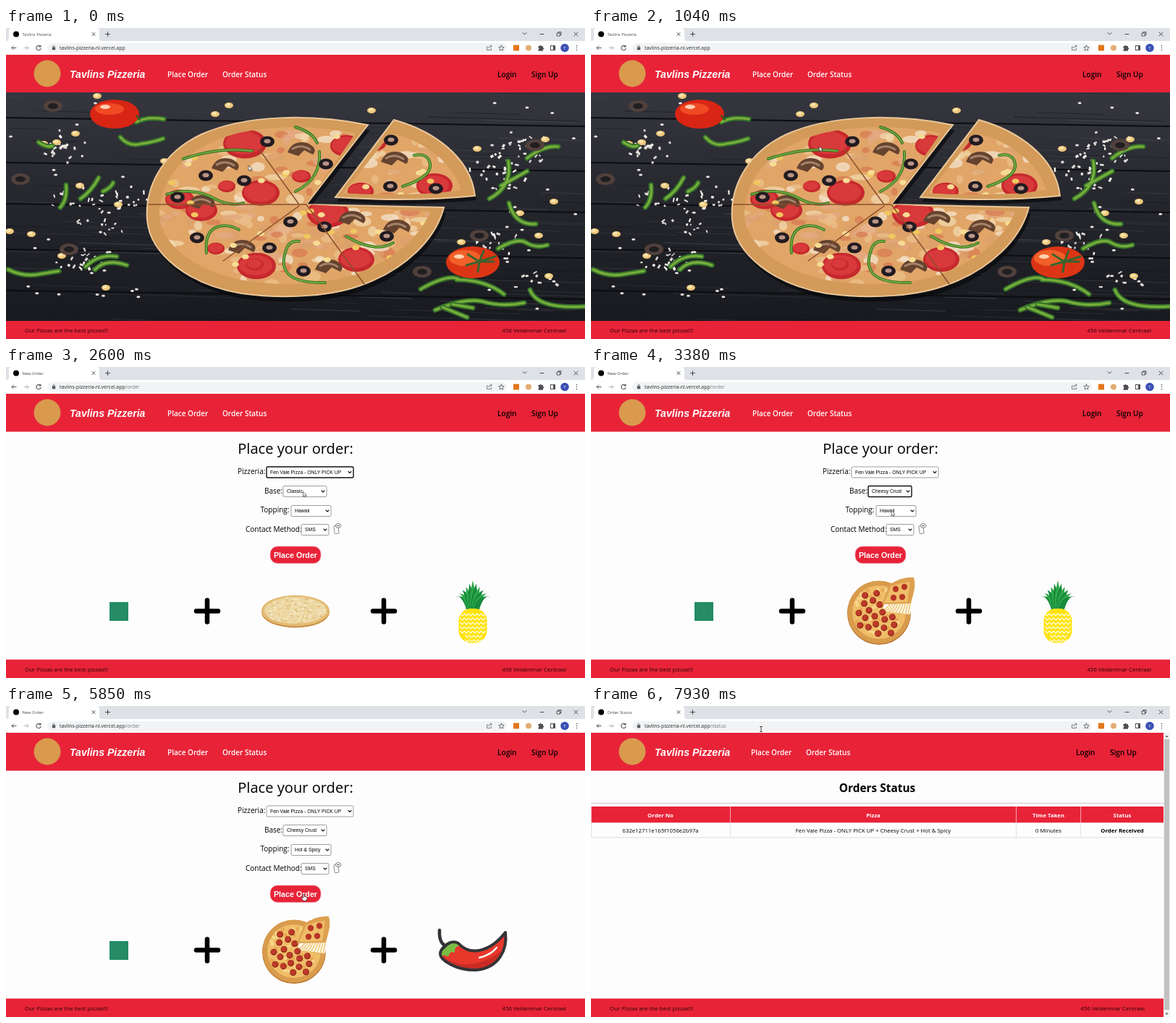
An HTML page for the animation above (8000 ms loop, 800 px wide and 430 px high).

```html
<!DOCTYPE html>
<html lang="en">
<head>
<meta charset="utf-8">
<title>Pizzeria</title>
<style>
html, body { margin: 0; width: 100%; height: 100%; overflow: hidden; background: #fff; }
svg { display: block; width: 800px; height: 430px; font-family: "Open Sans", "Noto Sans", sans-serif; }
.arial { font-family: "Liberation Sans", Arial, sans-serif; }
.line { fill: none; stroke-linecap: round; stroke-linejoin: round; }
</style>
</head>
<body>
<svg id="stage" viewBox="0 0 800 430">
  <g id="page"></g>
  <g id="hero"></g>
  <g id="cursor"></g>
</svg>
<script>
const $ = id => document.getElementById(id);
const RED = '#e82338', BRAND = 'Tavlins Pizzeria', HOST = 'tavlins-pizzeria-nl.vercel.app';

// Shape helpers, all returning markup
const rect = (x, y, w, h, fill, more = '') => `<rect x="${x}" y="${y}" width="${w}" height="${h}" fill="${fill}" ${more}/>`;
const oval = (x, y, rx, ry, fill, more = '') => `<ellipse cx="${x}" cy="${y}" rx="${rx}" ry="${ry}" fill="${fill}" ${more}/>`;
const dot = (x, y, r, fill, more) => oval(x, y, r, r, fill, more);
const shape = (d, fill, more = '') => `<path d="${d}" fill="${fill}" ${more}/>`;
const line = (d, color = '#4a4d51', width = 1, more = '') =>
  `<path class="line" d="${d}" stroke="${color}" stroke-width="${width}" ${more}/>`;
const text = (x, y, size, str, more = '') => `<text x="${x}" y="${y}" font-size="${size}" ${more}>${str}</text>`;
const BOLD = 'font-weight="700"', SEMI = 'font-weight="600"', MID = 'text-anchor="middle"', END = 'text-anchor="end"';
const WHITE = 'fill="#fff"';

let seed = 7;
const rnd = (a = 0, b = 1) => {
  seed = (seed * 16807) % 2147483647;
  return a + (b - a) * seed / 2147483647;
};
const pick = list => list[Math.floor(rnd(0, list.length))];

function buildHero() {
  const body = 'M500 134C420 118 330 120 270 147C212 174 192 224 195 265C199 314 254 355 325 367C390 376 455 370 495 354C552 333 594 292 605 248L415 244Z';
  const slice = 'M455 234L536 127C590 142 642 178 648 232Q560 241 455 234Z';
  const inner = 'M483 145C410 132 335 135 287 157C235 179 211 220 212 261C217 305 270 340 335 350C390 358 445 353 483 341C534 321 571 291 586 254L415 244Z';
  const innerSlice = 'M466 228L532 146C574 153 620 188 629 224Q560 234 466 228Z';
  const olive = ([x, y]) => oval(x, y, 10, 7.5, '#211b20') + oval(x, y - .5, 4.5, 3, '#b99486');
  const salami = ([x, y, r = 22]) => oval(x, y, r, r * .68, '#c6282d') + oval(x - 1, y - 1, r * .85, r * .52, '#d8393a');
  const mushroom = ([x, y]) => shape(`M${x - 19} ${y + 4}Q${x - 12} ${y - 14} ${x + 8} ${y - 9}Q${x + 24} ${y - 2} ${x + 16} ${y + 7}L${x + 4} ${y + 1}L${x - 4} ${y + 9}Z`, '#65432f') +
    line(`M${x - 12} ${y - 1}Q${x} ${y - 8} ${x + 12} ${y}`, '#a5836a', 3);
  const pepper = (d, w = 4) => line(d, '#35742a', w) + line(d, '#79ad3c', w * .45);
  let s = '<defs><clipPath id="view"><rect y="89" width="800" height="316"/></clipPath>' +
    `<clipPath id="pie"><path d="${inner}"/><path d="${innerSlice}"/></clipPath>` +
    '<linearGradient id="wood" x2="0" y2="1"><stop stop-color="#36363f"/><stop offset=".5" stop-color="#25262c"/><stop offset="1" stop-color="#191a1f"/></linearGradient></defs>' +
    '<g clip-path="url(#view)">' + rect(0, 89, 800, 316, 'url(#wood)');

  for (let i = 0; i < 130; i++) {
    const x = rnd(-100, 750), y = rnd(90, 404), w = rnd(40, 220);
    s += line(`M${x} ${y}l${w} ${w * .03}`, pick(['#4b4b54', '#15161a', '#3c3d45']), rnd(.4, 1.2), 'opacity=".6"');
  }
  for (const y of [128, 190, 247, 310, 367]) s += line(`M0 ${y - 4}L800 ${y + 8}`, '#0c0d10', 2);

  // Cheese crumbs and corn spread over the table
  const heaps = [[85, 235], [160, 238], [75, 165], [135, 270], [690, 210], [715, 165], [670, 188], [730, 345], [110, 320], [680, 300]];
  for (let i = 0; i < 170; i++) {
    const [hx, hy] = pick(heaps), spread = rnd(3, 34);
    const a = rnd(0, 6.28), x = hx + Math.cos(a) * spread * 1.2, y = hy + Math.sin(a) * spread * .7;
    s += rect(x, y, rnd(2, 6), rnd(1.5, 3.5), pick(['#f5f1eb', '#ddd8d5']), `transform="rotate(${rnd(0, 180)} ${x} ${y})"`);
  }
  for (let i = 0; i < 55; i++) {
    const x = i % 2 ? rnd(5, 185) : rnd(650, 795);
    s += oval(x, rnd(95, 395), 2.5, 1.5, '#e9e5e1');
  }
  for (const [x, y] of [[126, 94], [308, 107], [289, 119], [505, 114], [52, 160], [70, 158], [96, 146], [219, 184], [651, 167], [35, 285], [102, 218], [155, 244], [77, 315], [138, 359], [745, 154], [757, 240], [736, 287], [629, 296], [750, 343], [5, 281], [710, 256]])
    s += oval(x, y, 6, 4, '#edc77b') + oval(x - 1, y - 1, 3, 2, '#fae5ad');
  s += ['M158 151q12 14 29 9q16-2 30-7', 'M180 130q15-8 38-4', 'M75 248q10-11 8-31', 'M103 236q15-10 25-29', 'M45 158q12 8 19 5', 'M134 226q11-5 14-12', 'M3 334q22 11 45 6l25-4', 'M110 330q18-18 43-14m-30 18q15-16 44-6', 'M668 236q32-17 26-52m-10 34l36-20', 'M720 180q23-18 43-16', 'M695 242q8 31 37 29', 'M680 305q27-16 39-8q14 8 29 3', 'M573 361q37-21 52-14m-2 1q39 0 65 20', 'M593 390q40-17 65-12q27 8 58 2', 'M724 362q10 27 75 23', 'M603 386l34 14m-20-18l28 5'].map(d => pepper(d, 7)).join('');
  s += [[20, 209], [65, 108], [654, 287], [575, 337], [731, 162], [87, 306]].map(([x, y]) => oval(x, y, 13, 8, '#51413d') + oval(x, y, 7, 4, '#211e21')).join('');

  // Tomatoes
  s += oval(150, 119, 34, 20, '#d92514') + oval(143, 112, 20, 8, '#f04a25') + oval(137, 109, 7, 3, '#ffd0b5') + line('M180 121l5 6', '#315923', 2);
  s += oval(645, 324, 37, 22, '#dc3515') + oval(634, 318, 22, 11, '#f06028') + oval(626, 316, 7, 3, '#ffd4b0') +
    line('M654 323l-16-10m16 10l-18 5m18-5l6-15m-6 15l20 0m-20 0l-2 14m2-14l22-7', '#39632c', 3);

  // Pizza
  s += shape(body, '#08090c', 'transform="translate(3 7)" opacity=".7"') + shape(slice, '#08090c', 'transform="translate(2 6)" opacity=".7"');
  for (const d of [body, slice]) s += shape(d, '#d39a59', 'stroke="#e9c79b" stroke-width="2"');
  s += shape(inner, '#e1a568') + shape(innerSlice, '#e1a568') + '<g clip-path="url(#pie)">';
  for (let i = 0; i < 260; i++)
    s += oval(rnd(200, 640), rnd(130, 355), rnd(4, 15), rnd(3, 8), pick(['#f2d8ac', '#edc18b', '#dda06c', '#f4e5cd', '#d97c52', '#e5aa83']), 'opacity=".75"');
  s += [[330, 160, 30], [352, 228, 26], [270, 252], [470, 163], [346, 329, 27], [445, 256, 29], [484, 320, 25], [508, 158, 18], [490, 226, 18], [592, 218, 25], [240, 237, 20], [408, 205, 13], [290, 305, 12], [344, 327, 12], [305, 219, 12]].map(salami).join('');
  s += [[408, 168], [303, 190], [270, 241], [446, 330], [537, 181], [478, 263], [540, 275], [326, 303]].map(mushroom).join('');
  for (let i = 0; i < 42; i++) s += oval(rnd(225, 610), rnd(150, 340), 5, 3.5, pick(['#f0c75f', '#f6dc93']));
  s += '</g>';
  s += ['M245 181q48-17 95-11', 'M400 226q36-18 33-55', 'M222 230q38-11 68 7q21 10 38 5', 'M548 219q47-15 36-37q-5-9-20-6', 'M441 352q-71 2-54-45q4-14 18-12', 'M277 311q-3-30 15-36q14-5 30 4', 'M470 288q40 24 65 9', 'M400 137q24 7 30 22'].map(d => pepper(d)).join('');
  s += [[361, 157], [442, 188], [276, 204], [329, 211], [237, 234], [393, 268], [364, 304], [264, 290], [411, 336], [440, 275], [526, 288], [532, 155], [531, 219], [594, 222]].map(olive).join('');
  s += line('M197 244L415 244L495 354M405 244L350 168M405 246L300 322', '#8c4f2e', 1.5) + '</g>';
  return s;
}

function browser(title, path) {
  let s = rect(0, 0, 800, 18, '#dee1e6') + shape('M0 18q4 0 4-4V4q0-4 4-4H125q4 0 4 4v10q0 4 4 4Z', '#fff') + rect(0, 18, 800, 19, '#fff') +
    rect(57, 21, 635, 13, '#f1f3f4', 'rx="6.5"') + dot(14, 8.5, 4, '#000') + text(22.5, 10.8, 5.8, title, 'fill="#45484c"');
  s += line('M119 6.5l4 4m0-4l-4 4M137.500 8.500h6m-3-3v6M714 6.500l2.500 2.500l2.500-2.500M738 8.500h5M785 6l5 5m0-5l-5 5', '#36393d', .9) +
    line('M761.500 7h4v4h-4ZM763 7v-1.500h4v4h-1.500', '#36393d', .8);
  s += line('M14 27.500H8m2.500-2.500L8 27.500l2.500 2.500', '#54575b', 1) + line('M25 27.500h6m-2.500-2.500l2.500 2.500l-2.500 2.500', '#b2b5b8', 1) +
    line('M47.500 25.500a3.200 3.200 0 1 0 .6 3M48 24v2h-2', '#54575b', 1.1);
  s += rect(63.8, 26.5, 4.4, 3.8, '#54575b') + line('M64.800 26.500v-1.200q1.200-2 2.400 0v1.200', '#54575b', .8);
  s += text(74, 30, 6.9, `${HOST}<tspan fill="#777a7e">${path}</tspan>`, 'fill="#26282b"');
  s += line('M666 26h-1.500v4.500h6v-2M667 28q0-3 4-3m-1.500-1.500l1.700 1.500l-1.700 1.500', '#5f6368', .8) +
    line('M684.500 24l1.100 2.400l2.600.3l-1.900 1.800l.5 2.500l-2.300-1.200l-2.300 1.200l.5-2.500l-1.900-1.800l2.600-.3Z', '#4c4f53', .8);
  s += rect(701, 23.5, 8, 8, '#e2761b') + dot(722, 27.5, 4, '#e2ad74') +
    shape('M735.500 25h2q0-3 2.500 0h2v2.200q3 1 0 2.600v2h-6.500v-2q2-1.300 0-2.600Z', '#4c4f53') +
    rect(752.5, 24.5, 6, 6, 'none', 'stroke="#4c4f53"') + rect(756, 24, 3, 7, '#4c4f53') +
    dot(772, 27.5, 5.8, '#3b50b5') + text(772, 29.8, 6, 'T', `${MID} ${WHITE}`);
  return s + [24.5, 27.5, 30.5].map(y => dot(788.5, y, .8, '#4c4f53')).join('');
}

function frame(status, hover) {
  const w = status ? 791 : 800, dx = status ? -2 : 0, right = status ? -9 : 0;
  let s = rect(0, 37, 800, 393, '#fefdfe') + rect(0, 37, w, 52.5, RED) + rect(0, 404.500, w, 25.500, RED);
  s += dot(57, 63, 18.5, '#d99a4e');
  s += text(88, 69, 14.1, BRAND, `class="arial" font-style="italic" ${BOLD} ${WHITE}`);
  s += text(223 + dx, 67.7, hover ? 11.3 : 10, 'Place Order', `${hover ? BOLD : SEMI} ${WHITE}`);
  s += text((hover ? 309 : 299) + dx, 67.7, 10, 'Order Status', `${SEMI} ${WHITE}`);
  s += text(679 + right, 67.7, 10.1, 'Login', SEMI) + text(726 + right, 67.7, 10.1, 'Sign Up', SEMI);
  s += text(26, 421, 7.9, 'Our Pizzas are the best pizzas!!!', 'fill="#240408"') +
    text(774 + right, 421, 7.9, '456 Veldenmar Centraal', `${END} fill="#240408"`);
  if (status) s += rect(791, 37, 9, 393, '#f1f1f1') + rect(792, 46, 7, 374, '#c1c1c1') +
    shape('M793.500 43l2-2.500l2 2.500ZM793.500 424.500l2 2.500l2-2.500Z', '#555');
  return s;
}

function select(x, y, w, value, focus) {
  return rect(x, y, w, 15, '#fff', `rx="1.500" stroke="${focus ? '#111' : '#85858a'}" stroke-width="${focus ? 1.4 : .8}"`) +
    text(x + 5, y + 9.8, 6.8, value, 'class="arial"') +
    line(`M${x + w - 7} ${y + 6.500}l2 2l2-2`, '#111', 1.1);
}

const base = () => {
  seed = 21;
  let s = oval(400, 339, 47, 21.500, '#c78f43') + oval(400, 337, 47, 21.500, '#e3bb72') + oval(400, 336.500, 43, 18.500, '#ecd6a2');
  for (let i = 0; i < 130; i++) {
    const a = rnd(0, 6.28), r = Math.sqrt(rnd());
    s += oval(400 + 42 * r * Math.cos(a), 336.500 + 18 * r * Math.sin(a), 2, 1, pick(['#f6ebcb', '#dfbd79', '#f4e2b2']));
  }
  return s;
};

const cheesy = () => {
  seed = 5;
  let s = dot(398, 340, 44, '#b97532') + dot(398, 339, 43.500, '#d99b4c') + dot(398, 339, 37, '#efbd68');
  for (let i = 0; i < 50; i++) {
    const a = rnd(0, 6.28), r = 35 * Math.sqrt(rnd());
    s += dot(398 + r * Math.cos(a), 339 + r * Math.sin(a), 2.500, pick(['#f7d58c', '#e9a653']));
  }
  s += shape('M402 337L416 303L445 318L441 342Z', '#fffdf9');
  for (let i = 0; i < 9; i++) s += line(`M${403 + i * 4.500} ${336 + i * .7}Q${414 + i * 3} ${332 + i} ${415 + i * 3.500} 320`, '#f0ce86', 2);
  for (let i = 0; i < 25; i++) {
    const a = i * 2.4, r = 6.700 * Math.sqrt(i + .5), x = 398 + r * Math.cos(a), y = 339 + r * Math.sin(a);
    if (x < 405 || y > 344) s += dot(x, y, 4.500, '#8e2419') + dot(x - .4, y - .4, 3.600, '#bd3a29');
  }
  s += shape('M402 328L412 301Q431 289 446 291Q450 305 441 327Z', '#dda050') + shape('M405 326L415 303Q430 298 441 297L437 325Z', '#efbd68');
  return s + [[421, 307], [433, 304], [418, 319], [430, 318]].map(([x, y]) => dot(x, y, 4.200, '#b83626')).join('');
};

const pineapple = () => {
  let s = '';
  for (let i = 0; i < 11; i++) {
    const k = i - 5, x = 645 + k * 4.800, y = 295 + Math.abs(k) * 4.500;
    s += shape(`M${645 + k - 4} 335Q${645 + k * 2 - 5} 315 ${x} ${y}Q${645 + k * 2 + 5} 315 ${645 + k + 4} 335Z`, i % 2 ? '#2ea84a' : '#178b3b');
  }
  s += rect(625.500, 334, 39, 47.500, '#ffe30f', 'rx="17"');
  for (let y = 341; y < 379; y += 6) {
    const edge = y > 370 ? 9 : 2;
    s += line(`M${625.500 + edge} ${y}` + 'l2.900 3l2.900-3'.repeat(y > 370 ? 4 : 6), '#fffbd8', 1.300);
  }
  return s;
};

const chili = () => {
  const d = 'M606 333Q615 323 625 328C642 347 670 339 690 313C693 337 681 362 650 365C622 366 600 351 600 343Q600 337 606 333Z';
  return shape(d, '#e8372b') + shape('M608 349Q642 370 684 339Q674 362 648 363Q621 362 608 349Z', '#c92b24') +
    shape('M601 347Q597 335 607 328Q619 321 628 331Q619 332 620 341Q613 338 611 347Q606 342 601 347Z', '#79bd45') +
    line(d, '#343438', 4) + line('M606 331Q598 326 599 310', '#343438', 4.500) + line('M654 348Q670 344 678 334', '#fff', 2.500);
};

function orderPage(t) {
  const ready = t >= 1690, picked = t >= 2340, crust = t >= 3250, hot = t >= 4030;
  const label = (x, y, str) => text(x, y, 10, str);
  let s = text(400, 120, 20.1, 'Place your order:', `${MID} font-weight="500"`);
  s += label(320, 147.500, 'Pizzeria:') + label(357, 174.500, 'Base:') + label(351.500, 201.300, 'Topping:') + label(331, 228.200, 'Contact Method:');
  s += select(360, 138, 120, picked ? 'Fen Vale Pizza - ONLY PICK UP' : 'Pivorno - ONLY DELIVERY', t >= 2080 && t < 2730);
  s += select(383, 164.500, 60, crust ? 'Cheesy Crust' : 'Classic', t >= 2730 && t < 3510);
  s += select(394, 191.500, 55, hot ? 'Hot &amp; Spicy' : 'Hawaii', t >= 3510 && t < 4160);
  s += select(408, 217.500, 38, 'SMS', t >= 4550 && t < 5460);
  s += rect(365, 248, 70, 23.500, RED, 'rx="10" stroke="#f0a0aa" stroke-width=".8"') +
    text(400, 263.500, 10.700, 'Place Order', `class="arial" ${BOLD} ${MID} ${WHITE}`);
  if (!ready) return s;
  s += rect(453.500, 219.500, 6, 11, '#fff', 'rx="1" stroke="#777" stroke-width=".8" transform="rotate(-8 456 225)"') +
    oval(459, 219.500, 3.800, 2.800, '#fff', 'stroke="#555" stroke-width=".8"') + line('M457.500 219.500h3', '#555', 1);
  s += rect(143, 325, 26, 26, picked ? '#258c66' : '#0b648f');
  s += line('M263 337.500h30m-15-15v30M507 337.500h30m-15-15v30', '#000', 6.500);
  return s + (crust ? cheesy() : base()) + (hot ? chili() : pineapple());
}

function statusPage(hover) {
  const cell = (x, y, str, more = '') => text(x, y, 7.800, str, `${MID} ${more}`);
  const heads = [[96, 'Order No'], [390, 'Pizza'], [632, 'Time Taken'], [734, 'Status']];
  let s = text(395.500, 118.500, 15.400, 'Orders Status', `${MID} ${BOLD}`) + rect(0, 134, 791, 1, '#c9c7c9') +
    rect(0, 139, 791, 22.500, RED) + rect(0, 161.500, 791, 20.500, hover ? '#f3a4ae' : '#fefdfe') + rect(0, 181.500, 791, .8, '#d8d5d8');
  for (const x of [0, 192, 587, 676.300]) s += rect(x, 139, .8, 22.500, '#f8c9ce') + rect(x, 161.500, .8, 20.500, '#ddd8dc');
  for (const [x, str] of heads) s += cell(x, 154, str, `${BOLD} ${WHITE}`);
  return s + cell(96, 175, '632e12711e1b5f1056e2b97a') + cell(390, 175, 'Fen Vale Pizza - ONLY PICK UP + Cheesy Crust + Hot &amp; Spicy') +
    cell(632, 175, '0 Minutes') + cell(734, 175, 'Order Received', BOLD);
}

// Pointer stops: time, x, y
const stops = [[0, 335, 190], [520, 331, 187], [910, 328, 182], [1430, 247, 63], [1690, 247, 63], [2080, 415, 145], [2340, 418, 164],
  [2600, 410.500, 172], [3250, 412, 198], [3510, 418, 199], [4030, 425, 222], [4290, 427, 242], [4680, 428, 226], [5200, 428, 226],
  [5460, 414, 260], [5980, 410, 260], [6600, 738, 162], [6890, 744, 165], [7150, 735, 168], [7800, 252, 46], [7930, 235, 32], [8000, 235, 32]];

function pointer(t) {
  const i = stops.findIndex(s => s[0] > t), [a, ax, ay] = stops[i - 1], [b, bx, by] = stops[i];
  const k = (t - a) / (b - a), e = k * k * (3 - 2 * k);
  return [ax + (bx - ax) * e, ay + (by - ay) * e];
}

function cursorShape(x, y, hand) {
  const at = `transform="translate(${x} ${y})"`;
  if (y < 35) return line('M-1.500-3.500h3M0-3.500v7M-1.500 3.500h3', '#222', .8, at);
  if (hand) return shape('M0 0q1-1 1.700 0v3.500l3 .7q1 .5.700 2l-.9 3H0l-2.500-4q0-1.500 1.500-.5L0 5.500Z', '#fff', `stroke="#222" stroke-width=".7" ${at}`);
  return shape('M0 0V7.200L1.700 5.700L2.900 8.300L4 7.800L2.900 5.300H5Z', '#fff', `stroke="#222" stroke-width=".6" ${at}`);
}

function render(t) {
  const home = t < 1500, status = t >= 6110, [x, y] = pointer(t);
  const overNav = !status && x > 222 && x < 290 && y > 55 && y < 75;
  const overRow = y > 161.500 && y < 182;
  const overButton = !home && !status && x > 365 && x < 435 && y > 248 && y < 272;
  const title = t < 1690 ? BRAND : status ? 'Order Status' : 'New Order';
  $('page').innerHTML = browser(title, home ? '' : status ? '/status' : '/order') + frame(status, overNav) +
    (home ? '' : status ? statusPage(overRow) : orderPage(t));
  $('hero').style.display = home ? '' : 'none';
  $('cursor').innerHTML = cursorShape(x, y, overNav || overButton);
}

$('hero').innerHTML = buildHero();
const start = performance.now();
let shown = -1;
function tick() {
  const t = (performance.now() - start) % 8000, step = Math.floor(t / 130) * 130;
  if (step !== shown) render(shown = step);
  requestAnimationFrame(tick);
}
tick();
</script>
</body>
</html>
```
